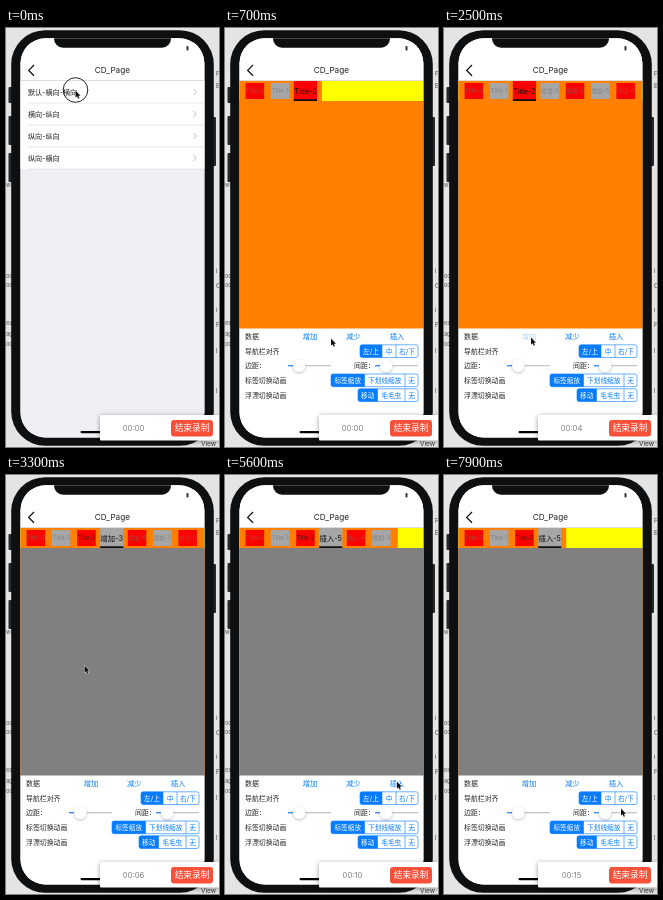
Recreate the animation shown at these times as an HTML page with a canvas. Size 213 by 419 pixels, loop 8 s.

```html
<!DOCTYPE html>
<html lang="zh">
<head>
<meta charset="utf-8">
<style>
html, body { margin: 0; width: 100%; height: 100%; overflow: hidden; background: #e4e4e4; }
canvas { display: block; width: 213px; height: 419px; }
</style>
</head>
<body>
<canvas id="stage"></canvas>
<script>
const W = 213, H = 419, LOOP = 8000, BLUE = '#087cff', BLACK = '#0e0f11';
const FONT = 'Inter, "Noto Sans CJK SC", "Noto Sans CJK", sans-serif';
const canvas = document.getElementById('stage');
const c = canvas.getContext('2d');
const dpr = window.devicePixelRatio || 1;
canvas.width = W * dpr;
canvas.height = H * dpr;

// taps: [time, button index]; buttons are add, remove, insert
const taps = [[1200, 0], [1600, 0], [2000, 0], [2400, 0], [4000, 1], [4200, 1], [4500, 1],
  [5200, 2], [5400, 2], [6400, 1], [6800, 1]];
const buttons = [['增加', 85], ['减少', 128.2], ['插入', 172]];

// pointer: [time, x, y]
const route = [[0, 69.5, 62], [300, 70, 63], [700, 106, 310], [1000, 87, 309], [2500, 87, 309],
  [2900, 132, 192], [3200, 79, 190], [3400, 78, 190], [3900, 127, 308], [4500, 128, 307],
  [4700, 141, 307], [5100, 171, 306], [5700, 172, 306], [6200, 129, 307], [6900, 130, 307],
  [7400, 155, 320], [7900, 177, 333]];

const clamp = v => Math.max(0, Math.min(1, v));
const mix = (a, b, p) => a + (b - a) * p;
const easeOut = p => 1 - (1 - p) ** 3;

function rect(x, y, w, h, fill, r = 0) {
  c.fillStyle = fill;
  c.beginPath();
  c.roundRect(x, y, w, h, r);
  c.fill();
}
function text(s, x, y, size, color = '#222', align = 'left') {
  c.font = `${size}px ${FONT}`;
  c.fillStyle = color;
  c.textAlign = align;
  c.textBaseline = 'alphabetic';
  c.fillText(s, x, y + size * 0.37);
}
function line(points, color, width) {
  c.strokeStyle = color;
  c.lineWidth = width;
  c.beginPath();
  points.forEach(([x, y]) => c.lineTo(x, y));
  c.stroke();
}
function shadow(color, blur, y = 0) {
  c.shadowColor = color;
  c.shadowBlur = blur * dpr;
  c.shadowOffsetY = y * dpr;
}

function tabsAt(t) {
  const tabs = ['Title-0', 'Title-1', 'Title-2'];
  for (const [at, kind] of taps) {
    if (t < at) break;
    if (kind === 0) tabs.push('增加-' + tabs.length);
    else if (kind === 1) tabs.pop();
    else tabs.splice(3, 0, '插入-' + tabs.length);
  }
  return tabs;
}

function drawBackdrop() {
  rect(0, 0, W, H, '#e4e4e4');
  for (const [s, y] of [['wi', 157], ['oo', 248], ['oo', 257], ['ea', 295], ['age', 306], ['oo', 316]])
    text(s, 0, y, 5.5, '#555');
  for (const [s, y] of [['F', 46], ['E', 58], ['i', 243], ['C', 258], ['i', 282], ['F', 297],
    ['l', 323], ['l', 363]]) text(s, 210, y, 6, '#444');
  text('View', 195, 416, 6.5, '#333');
}

function drawPhone() {
  for (const [x, y, h] of [[2.5, 59, 16], [2.5, 88, 29], [2.5, 125, 29], [206, 89, 49]])
    rect(x, y, 4, h, '#25272b', 1);
  rect(5.2, 2.2, 202.6, 415.6, BLACK, 34);
}

function drawList() {
  rect(14, 53, 185, 360, '#efeff4');
  rect(14, 53, 185, 88, '#fff');
  ['默认-横向-横向', '横向-纵向', '纵向-纵向', '纵向-横向'].forEach((s, i) => {
    const y = 64 + i * 22;
    text(s, 22, y, 7.1);
    line([[187.5, y - 3], [190.5, y], [187.5, y + 3]], '#b8b8bc', 0.9);
    rect(22, y + 10.7, 177, 0.5, '#d0d0d4');
  });
}

function drawTabs(t, current) {
  const tabs = tabsAt(t);
  const left = 17.2, pitch = 25.3, width = 23.2;
  rect(14, 53, 185, 20, '#ffff00');
  rect(14, 53, Math.min(185, 7 + tabs.length * pitch), 20, '#ff8000');
  tabs.forEach((s, i) => {
    const near = clamp(1 - Math.abs(i - current));
    const scale = mix(0.8, 1, near);
    const x = left + (i + 0.5) * pitch;
    const w = width * scale, h = 20 * scale;
    rect(x - w / 2, 63 - h / 2, w, h, i % 2 ? '#a6a6a6' : '#ff0000');
    const color = i === 2 && current > 2.9 ? '#4c1a16'
      : near > 0.5 ? '#111' : i % 2 ? '#828282' : '#a34840';
    text(s, x, 62.8, 7.3 * scale, color, 'center');
  });
  rect(left + (current + 0.5) * pitch - width / 2, 71.3, width, 1.7, '#111');
}

function segments(y, edges, labels) {
  const x = edges[0], w = edges[edges.length - 1] - x, h = 12.7;
  rect(x, y, edges[1] - x, h, BLUE, [2, 0, 0, 2]);
  c.strokeStyle = BLUE;
  c.lineWidth = 0.6;
  c.beginPath();
  c.roundRect(x, y, w, h, 2);
  c.stroke();
  labels.forEach((s, i) => {
    if (i) line([[edges[i], y], [edges[i], y + h]], BLUE, 0.6);
    text(s, (edges[i] + edges[i + 1]) / 2, y + h / 2, 6.7, i ? BLUE : '#fff', 'center');
  });
}

function slider(x, thumb) {
  rect(x, 337.3, 43, 1, '#b5b5b8');
  rect(x, 337.3, thumb - x, 1, BLUE);
  c.save();
  shadow('rgba(0,0,0,.25)', 3, 1);
  rect(thumb - 6.3, 331.5, 12.6, 12.6, '#fff', 6.3);
  c.restore();
}

function drawPanel(t) {
  rect(14, 300.4, 185, 113, '#fff');
  [['数据', 308.4], ['导航栏对齐', 323], ['边距：', 337.7], ['标签切换动画', 352.3], ['浮漂切换动画', 367]]
    .forEach(([s, y]) => text(s, 20, y, 6.9));
  text('间距：', 129, 337.7, 6.9);
  buttons.forEach(([s, x], i) => {
    const pressed = taps.some(([at, kind]) => kind === i && t >= at - 100 && t <= at + 100);
    c.globalAlpha = pressed ? 0.3 : 1;
    text(s, x, 308.3, 7.3, BLUE, 'center');
    c.globalAlpha = 1;
  });
  segments(316.8, [135, 157, 171, 193], ['左/上', '中', '右/下']);
  slider(63, 74.3);
  slider(150, 161.2);
  segments(346, [106, 139.5, 180, 193], ['标签缩放', '下划线缩放', '无']);
  segments(360.8, [133, 152.5, 180, 193], ['移动', '毛毛虫', '无']);
}

function drawPager(t) {
  const p = easeOut(clamp((t - 2900) / 350));
  rect(14, 73, 185, 228, '#ff8000');
  rect(14 + 185 * (1 - p), 73, 185, 228, '#808080');
  drawTabs(t, 2 + p);
  drawPanel(t);
}

function drawScreen(t) {
  c.save();
  c.beginPath();
  c.roundRect(14.5, 10.3, 183.9, 399.2, 25);
  c.clip();
  rect(14, 10, 185, 400, '#fff');

  const push = easeOut(clamp((t - 300) / 350));
  if (push < 1) {
    c.save();
    c.translate(-55 * push, 0);
    drawList();
    c.restore();
  }
  if (push > 0) {
    c.save();
    c.translate(184 * (1 - push), 0);
    drawPager(t);
    c.restore();
  }

  rect(14, 10, 185, 43, '#fff');
  rect(14, 52.6, 185, 0.5, '#bbb');
  line([[28, 37], [22.7, 42.4], [28, 47.8]], '#111', 1.3);
  text('CD_Page', 106.4, 42.2, 8.2, '#222', 'center');
  rect(180.5, 18, 2, 4.5, '#333', 0.8);
  rect(74.5, 403, 65, 2.2, '#000', 1.1);
  rect(48, 0, 117, 19.7, BLACK, 9);
  c.restore();
}

function drawRecorder(t) {
  c.save();
  shadow('rgba(0,0,0,.4)', 5, 1);
  rect(94, 387, 120, 25.6, '#fff', 1);
  c.restore();
  const s = Math.max(0, Math.floor(t / 500 - 0.5));
  text('00:' + String(s).padStart(2, '0'), 127.5, 400.3, 7.7, '#808080', 'center');
  rect(165, 392, 42, 16.5, '#f9503a', 3);
  text('结束录制', 186, 400.2, 8.7, '#fff', 'center');
}

function drawPointer(t) {
  const i = Math.max(1, route.findIndex(k => k[0] >= t));
  const [t0, x0, y0] = route[i - 1], [t1, x1, y1] = route[i];
  const p = clamp((t - t0) / (t1 - t0)), e = p * p * (3 - 2 * p);
  const x = mix(x0, x1, e), y = mix(y0, y1, e);
  if (t < 300) {
    c.strokeStyle = '#222';
    c.lineWidth = 1;
    c.beginPath();
    c.arc(x, y, 12.3, 0, Math.PI * 2);
    c.stroke();
  }
  c.save();
  c.translate(x, y + 0.5);
  c.scale(0.9, 0.9);
  c.beginPath();
  [[0, 0], [0, 8], [1.8, 6.4], [3.1, 9.2], [4.4, 8.6], [3.2, 5.9], [5.6, 5.7]]
    .forEach(q => c.lineTo(...q));
  c.closePath();
  c.strokeStyle = '#fff';
  c.lineWidth = 1;
  c.stroke();
  c.fillStyle = '#111';
  c.fill();
  c.restore();
}

function frame(now) {
  const t = Math.floor((now % LOOP) / 100) * 100;
  c.setTransform(dpr, 0, 0, dpr, 0, 0);
  drawBackdrop();
  drawPhone();
  drawScreen(t);
  drawRecorder(t);
  drawPointer(t);
  requestAnimationFrame(frame);
}
requestAnimationFrame(frame);
</script>
</body>
</html>
```
